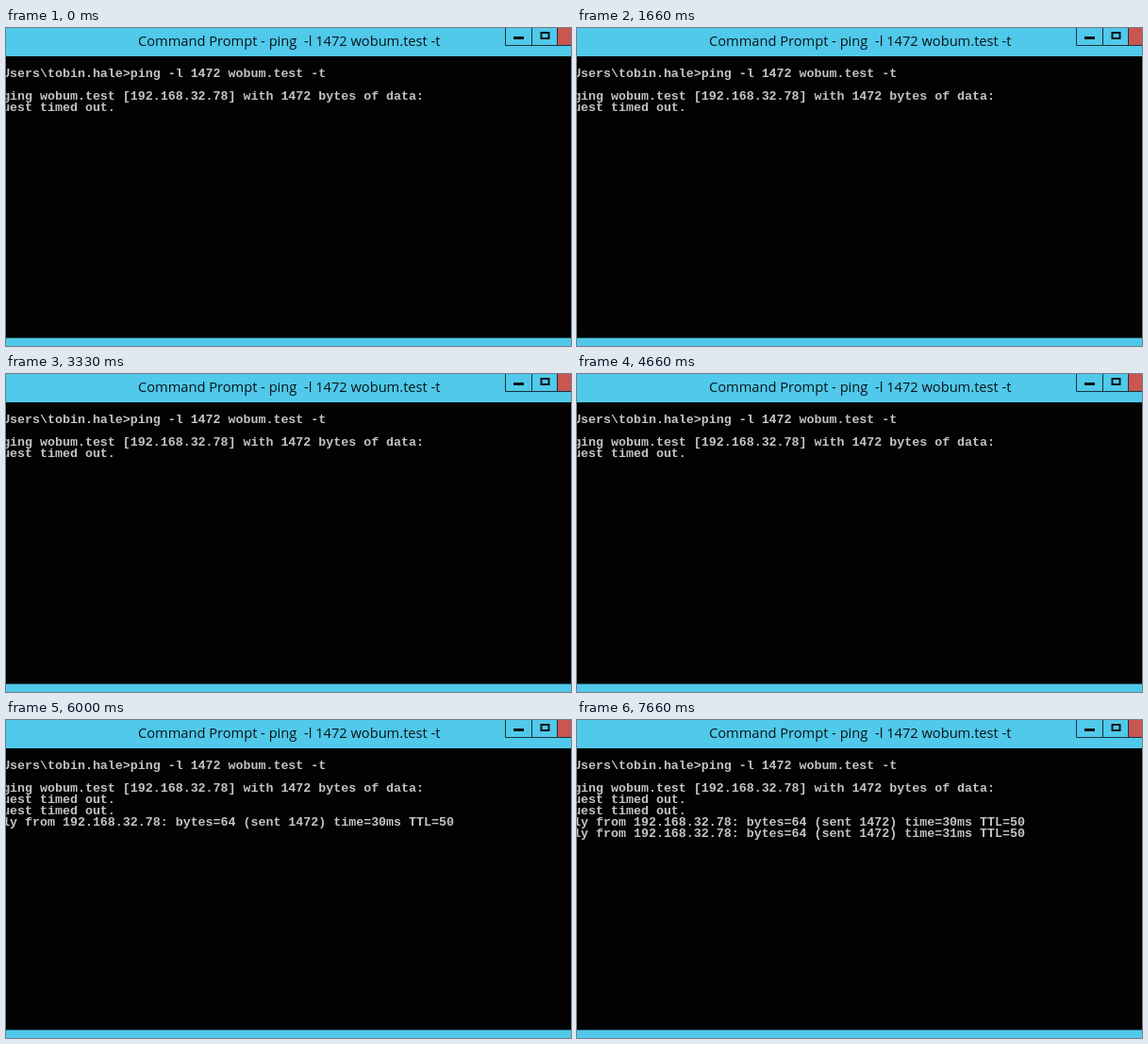
An HTML page for the animation above (8000 ms loop, 599 by 337 pixels).

```html
<!DOCTYPE html>
<html lang="en">
<head>
<meta charset="utf-8">
<title>Command Prompt</title>
<style>
  html, body { margin: 0; width: 100%; height: 100%; overflow: hidden; background: #020202; }
  svg { display: block; width: 599px; height: 337px; }
  text { white-space: pre; }
  .title { font: 14.65px "Open Sans", "Noto Sans", sans-serif; fill: #0b1418; }
  .term { font: bold 13.3px "Liberation Mono", "DejaVu Sans Mono", monospace; fill: #c4c4c4; }
</style>
</head>
<body>
<svg viewBox="0 0 599 337">
  <rect width="599" height="337" fill="#50c9ea"/>
  <rect y="30" width="599" height="299" fill="#020202"/>
  <rect y="328" width="599" height="1" fill="#2a6a7c"/>
  <text class="title" x="140" y="19">Command Prompt - ping  -l 1472 wobum.test -t</text>

  <g id="buttons">
    <rect x="585" width="14" height="18" fill="#c9564f"/>
    <path d="M529.5 0V18.5H599M557.5 0V18.5M584.5 0V18.5" fill="none" stroke="#17343f"/>
    <rect x="538" y="9" width="11" height="3" fill="#0b1418"/>
    <rect x="567.5" y="5" width="8" height="6" fill="none" stroke="#0b1418" stroke-width="2"/>
  </g>

  <g id="screen" class="term"></g>
</svg>
<script>
  const LOOP = 8000, LEFT = -27.8, TOP = 52, ROW = 12;
  const host = "wobum.test", ip = "192.168.32.78";
  const reply = ms => `Reply from ${ip}: bytes=64 (sent 1472) time=${ms}ms TTL=50`;

  // row, time of appearance, text
  const rows = [
    [0, 0, `C:\\Users\\tobin.hale>ping -l 1472 ${host} -t`],
    [2, 0, `Pinging ${host} [${ip}] with 1472 bytes of data:`],
    [3, 0, "Request timed out."],
    [4, 5000, "Request timed out."],
    [5, 6000, reply(30)],
    [6, 7330, reply(31)]
  ];

  const screen = document.getElementById("screen");
  const lines = rows.map(([row, at, str]) => {
    const el = document.createElementNS(screen.namespaceURI, "text");
    el.setAttribute("x", LEFT);
    el.setAttribute("y", TOP + row * ROW);
    el.textContent = str;
    screen.append(el);
    return { el, at };
  });

  const start = performance.now();
  function draw(now) {
    const t = Math.max(0, now - start) % LOOP;
    for (const { el, at } of lines)
      el.setAttribute("visibility", t >= at ? "visible" : "hidden");
    requestAnimationFrame(draw);
  }
  draw(start);
</script>
</body>
</html>
```
